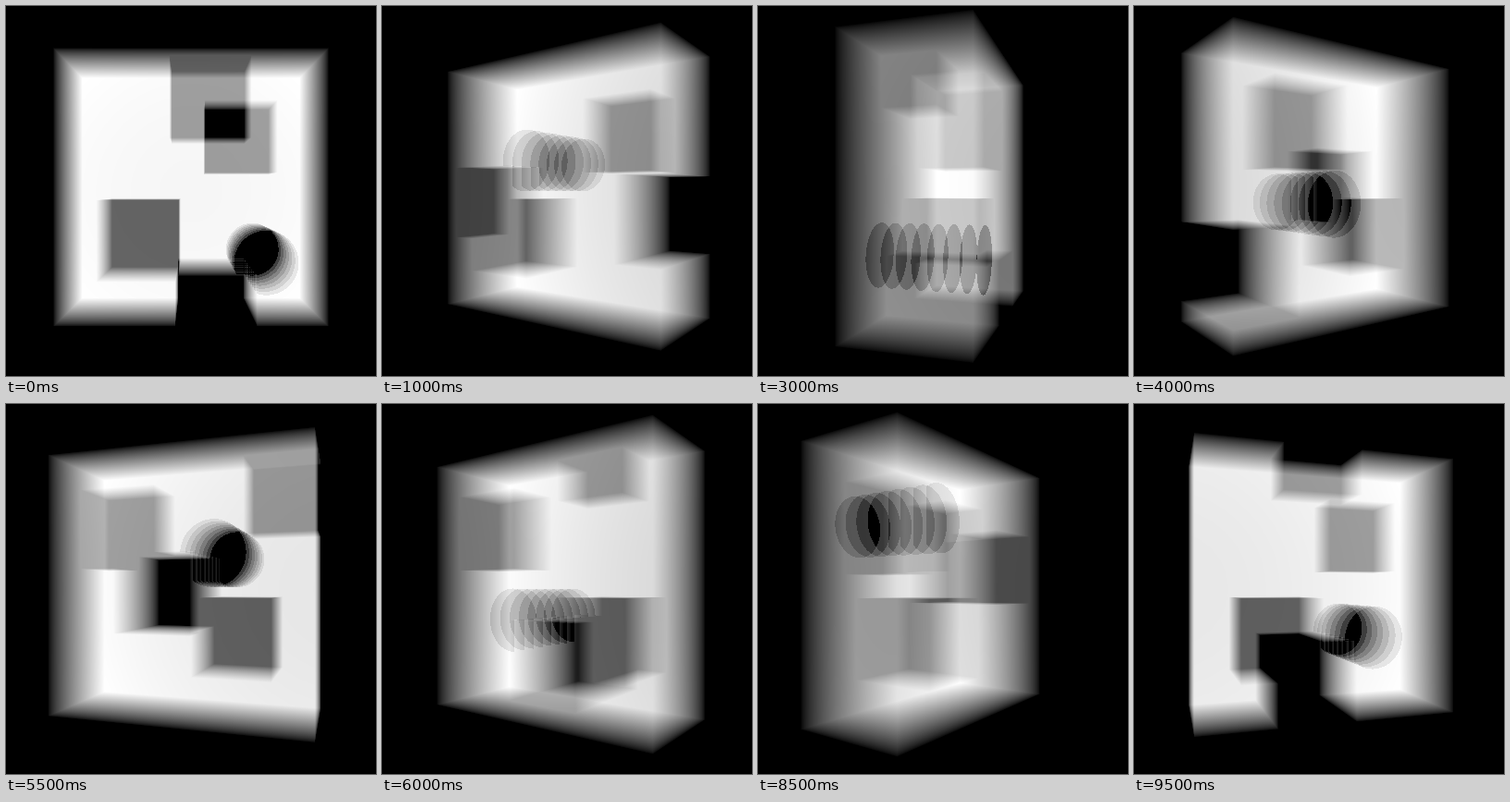
These frames come from a looping animation (400x400 px, 10000 ms). An HTML page with a canvas:

```html
<!DOCTYPE html>
<html lang="en">
<head>
<meta charset="utf-8">
<title>Rotating translucent block</title>
<style>
html, body { margin: 0; width: 100%; height: 100%; overflow: hidden; background: #000; }
canvas { display: block; width: 400px; height: 400px; }
</style>
</head>
<body>
<canvas id="c" width="400" height="400"></canvas>
<script>
const SIZE = 400, FOCAL = 500, DIST = 3.71, GAMMA = 0.66;
const STEPS = 20, STEP_MS = 500;
const HALF = 0.295, RADIUS = 0.236, SLICES = 8;
const Z0 = -0.5, Z1 = 0.389, ZM = (Z0 + Z1) / 2, DZ = (Z1 - Z0) / SLICES;
const BLOCK = [-0.988, 0.988, -1.027, 0.973, Z0, Z1];

const ctx = document.getElementById('c').getContext('2d');
const image = ctx.createImageData(SIZE, SIZE);
const depth = new Float32Array(SIZE * SIZE);

const hole = (x, y, z0, z1) => [x - HALF, x + HALF, y - HALF, y + HALF, z0, z1];

// Entry and exit of the ray o + t * d through a box, or null
function cross(b, o, d) {
  let near = -Infinity, far = Infinity;
  for (let i = 0; i < 3; i++) {
    const p = (b[2 * i] - o[i]) / d[i], q = (b[2 * i + 1] - o[i]) / d[i];
    near = Math.max(near, Math.min(p, q));
    far = Math.min(far, Math.max(p, q));
  }
  return near < far ? [near, far] : null;
}

// Length of solid material along one ray
function solid(o, d, holes, disc) {
  const span = cross(BLOCK, o, d);
  if (!span) return 0;
  const [near, far] = span, gaps = [];
  for (const h of holes) {
    const g = cross(h, o, d);
    if (g) gaps.push(g);
  }
  gaps.sort((a, b) => a[0] - b[0]);
  let len = 0, at = near;
  for (const [a, b] of gaps) {
    if (a > at) len += Math.min(a, far) - at;
    at = Math.max(at, Math.min(b, far));
  }
  len += far - at;

  // The round hole is a stack of thin discs
  for (let i = 0; i < SLICES; i++) {
    const t = (Z0 + (i + 0.5) * DZ - o[2]) / d[2];
    if (t < near || t > far) continue;
    const x = o[0] + t * d[0] - disc[0], y = o[1] + t * d[1] - disc[1];
    if (x * x + y * y < RADIUS * RADIUS && !gaps.some(g => t > g[0] && t < g[1]))
      len -= DZ / Math.abs(d[2]);
  }
  return Math.max(0, len) * Math.hypot(...d);
}

function draw(step) {
  const turn = step / STEPS * 2 * Math.PI, phase = 3 * turn;
  const c = Math.cos(turn), s = Math.sin(turn);
  const lead = 0.55 * Math.cos(phase), lag = 0.55 * Math.cos(phase - 2);
  const holes = [
    hole(-0.41 + lead, -0.45 + lag, ZM, Z1),
    hole(0.41 + lag, 0.355 + lead, Z0, Z1),
    hole(0.41, -0.445, Z0, ZM),
    hole(-0.385, 0.36, Z0 + 2 * DZ, Z1)
  ];
  const disc = [0.015 + 0.535 * Math.cos(phase), 0.53 * Math.cos(phase + 0.14)];
  const eye = [DIST * s, 0, DIST * c];
  let max = 0;
  for (let y = 0, i = 0; y < SIZE; y++) {
    for (let x = 0; x < SIZE; x++, i++) {
      const u = (x + 0.5 - SIZE / 2) / FOCAL, v = (y + 0.5 - SIZE / 2) / FOCAL;
      depth[i] = solid(eye, [u * c - s, v, -u * s - c], holes, disc);
      max = Math.max(max, depth[i]);
    }
  }
  for (let i = 0; i < depth.length; i++) {
    const g = 255 * Math.pow(depth[i] / max, GAMMA);
    image.data.set([g, g, g, 255], 4 * i);
  }
  ctx.putImageData(image, 0, 0);
}

const start = performance.now();
let shown = 0;
function tick(now) {
  const step = Math.floor(Math.max(0, now - start) / STEP_MS) % STEPS;
  if (step !== shown) draw(shown = step);
  requestAnimationFrame(tick);
}
draw(0);
requestAnimationFrame(tick);
</script>
</body>
</html>
```
